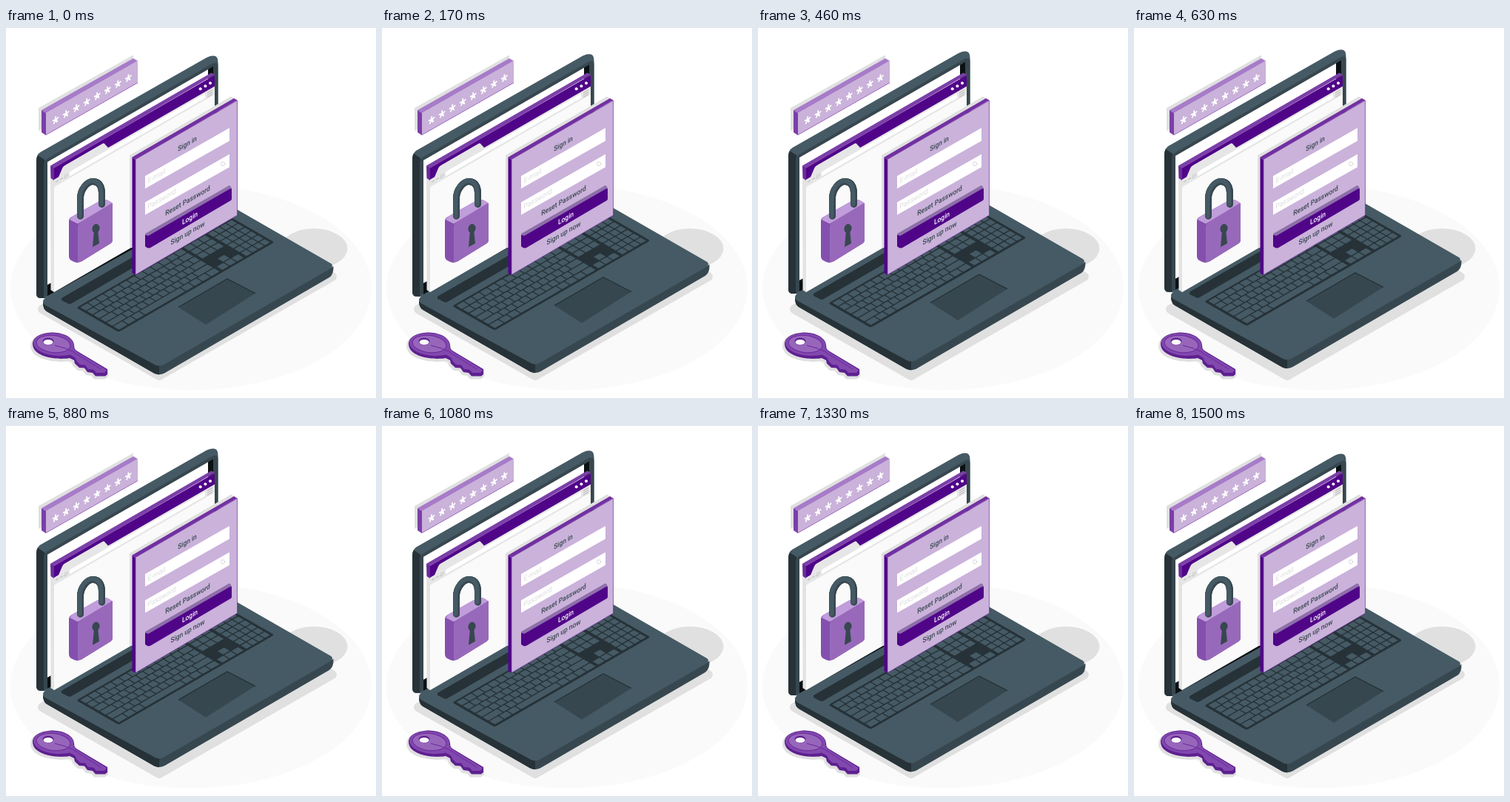
An HTML page for the animation above (1540 ms loop, 500x500 px).

```html
<!DOCTYPE html>
<html lang="en">
<head>
<meta charset="utf-8">
<title>Sign in</title>
<style>
  html, body { margin: 0; width: 100%; height: 100%; overflow: hidden; background: #fff; }
  svg { display: block; width: 100vw; height: 100vh; }
  text { font: 500 9.7px Roboto, sans-serif; fill: #37474f; text-anchor: middle; }
  .hint { font-weight: 300; fill: #c9c9c9; text-anchor: start; letter-spacing: .2px; }
</style>
</head>
<body>
<svg viewBox="0 0 500 500">
  <ellipse cx="250" cy="351" rx="244" ry="138.500" fill="#fafafa"/>
  <ellipse cx="416" cy="298" rx="45.500" ry="27" fill="#e0e0e0"/>
  <path d="M49 380 207 470 441 336 281 247Z" fill="#e0e0e0" stroke="#e0e0e0" stroke-width="12" stroke-linejoin="round"/>

  <g id="laptop">
    <!-- lid -->
    <path d="M41 359V179Q41 171 47 167.500L271 40Q286.500 33 286.500 46V250L55 365H47Q41 365 41 359Z" fill="#455a64"/>
    <path d="M41 359V179Q41 175 43 172L52 178V365H47Q41 365 41 359Z" fill="#263238"/>
    <path d="M51 364V184Q51 179.500 55 177L277 49Q286.500 44 286.500 51V250Z" fill="#37474f"/>
    <path d="M56 181 280 52V240L56 362Z" fill="#0b1013"/>
    <path d="M56 181 273 56V230L56 347Z" fill="#fff"/>
    <!-- base -->
    <path d="M50 371Q50 380 55 383L200 466.500Q207 470 214 466.500L437 337Q443 333 442.500 322L207 440Z" fill="#37474f"/>
    <path d="M50 371Q50 380 55 383L200 466.500Q203 468 207 468.500V450Z" fill="#263238"/>
    <path d="M54 364 290 232.500 437 317Q445 321 437 326L213 455Q207 458 201 455L54 375Q46 370 54 364Z" fill="#455a64"/>
    <path d="M75 365 280 247 292 254 89 372Q86 374 83 372L75 368Z" fill="#263238"/>
    <g id="keys" transform="matrix(.866 -.5 .866 .5 95 378)">
      <rect width="243" height="66" rx="3" fill="#263238"/>
    </g>
    <path d="M232.500 377 299 338.500 337 358.500 270 401Z" fill="#37474f"/>
    <path d="M233 377.300 299 339 337 358.700" fill="none" stroke="#263238" stroke-width="1.300"/>
  </g>

  <!-- browser window -->
  <path d="M60 187 65 190V357L60.500 354Z" fill="#e3e3e3"/>
  <path d="M60 186 277.500 60.500 282 63 65 190Z" fill="#7b3fa8"/>
  <path d="M60 186 65 189V206L60.500 203Z" fill="#6a2a9c"/>
  <g transform="matrix(1 -.5774 0 1 65 189)">
    <path d="M0 0H217V168H0Z" fill="#fafafa"/>
    <path d="M0 0H217V16H0Z" fill="#500589"/>
    <path d="M0 16H6L11 7Q12 5 14 5H65Q67 5 68 6.500L73 15H217V26H0Z" fill="#e6e6e6"/>
    <path d="M21 17.500H204V23.500H21Z" fill="#fff"/>
    <path d="M2 20.500H6M8 20.500H12M207 18H214M207 21H214M207 24H214" stroke="#b0b0b0"/>
    <circle cx="16" cy="20.500" r="2" fill="none" stroke="#c8c8c8"/>
  </g>
  <g fill="#fff">
    <circle cx="262.700" cy="82.300" r="2"/><circle cx="269.400" cy="78.600" r="2"/><circle cx="276" cy="74.600" r="2"/>
  </g>

  <!-- padlock -->
  <path d="M85 261Q85 257 89 255L128 233Q133 231 138 233L144 237V286Q144 290 140 292L102 315.500Q97 318 92 316L88 314Q85 312 85 308Z" fill="#8550ad"/>
  <path d="M86 259 89 255 128 233Q133 231 138 233L144 236.500 97 264.500Z" fill="#c09ddb"/>
  <path d="M97 268Q97 265 100 263L140 238.500Q144 236 144 240V286Q144 290 140 292L102 315.500Q97 318 97 313Z" fill="#9869bb"/>
  <g fill="none" stroke-linecap="round">
    <path id="arch" d="M100.500 254V230C100.500 218 110 207 118 207.500C126 208 129.500 214 129.500 223V238" stroke="#37474f" stroke-width="9"/>
    <use href="#arch"/>
    <path d="M99.500 254V230C99.500 217 109 206 117 206.500C125 207 128.500 213 128.500 223V238" stroke="#455a64" stroke-width="6"/>
  </g>
  <path d="M119 274 117 296 126 291 124 272Z" fill="#37474f"/>
  <ellipse cx="121.500" cy="271" rx="5" ry="6.200" fill="#37474f" transform="rotate(15 121.500 271)"/>

  <!-- password strip -->
  <path d="M44 108 172 36.500V70L44 139Z" fill="#e0e0e0"/>
  <path d="M48 111 172 41 178 44.500 54 115Z" fill="#a77bc9"/>
  <path d="M48 111 54 115V145L48 141Z" fill="#7b3fa8"/>
  <path d="M54 115 178 44.500V74L54 144.500Z" fill="#cab2da"/>
  <path d="M54 144.500 178 74" stroke="#8d4fb8" stroke-width=".8"/>
  <g id="stars" stroke="#fff" stroke-width="2.200" stroke-linecap="round"></g>

  <!-- sign-in panel -->
  <path d="M167 172 304 92.500 309 95.500 171 176V297L167 297Z" fill="#e0e0e0"/>
  <path d="M170.500 174.500 308 95 312.500 97.500 175 178Z" fill="#7230a2"/>
  <path d="M170.500 174.500 175 178V334L170.500 331Z" fill="#500589"/>
  <path d="M175 177.500 312.500 98V253L175 333.500Z" fill="#cab2da" stroke="#7230a2" stroke-width=".7"/>
  <path d="M188 200 302 135V152.500L188 217ZM188 235.500 302 170.500V188L188 252.500Z" fill="#fff"/>
  <circle cx="293" cy="183.500" r="2.500" fill="none" stroke="#dcdcdc" stroke-width="1.800" stroke-dasharray="1.300 .7"/>
  <path d="M188 278 302 212.500 305 216 192 282Z" fill="#8d6fa9"/>
  <path d="M188 280Q188 278 192 281L303 217Q305 216 305 218V231Q305 232.500 303 233.500L195 297Q192 298 190 296.500L188 295Z" fill="#500589"/>
  <g id="labels"></g>

  <!-- key -->
  <path d="M36 427C36 417 49 411.500 64 411.500C80 412 92.500 419.500 92 430Q92 434 96 436.500L137 461V468L134 470.500H121L117 466 110 465 106 459.500 99 459 93 453.500 92 449 86 446C70 449 36 445 36 427Z" fill="#e0e0e0" stroke="#e0e0e0" stroke-width="4" transform="translate(-1 2)"/>
  <path d="M36 427C36 417 49 411.500 64 411.500C80 412 92.500 419.500 92 430Q92 434 96 436.500L137 461V468L134 470.500H121L117 466 110 465 106 459.500 99 459 93 453.500 92 449 86 446C70 449 36 445 36 427Z" fill="#5e2090"/>
  <path d="M37 425C37.500 417 49 412.500 64 412.500C80 413 91.500 420 91 428Q90.500 433 95 437L136 462 133 466H122L118 461.500 111 461 107 455.500 100 455 95 449.500 93 445 86 441.500C68 446 38 440 37 425Z" fill="#8148ae"/>
  <ellipse cx="64" cy="427" rx="23" ry="11.500" fill="#9766bb" stroke="#6a2a9c" transform="rotate(7 64 427)"/>
  <path d="M66 429Q80 432 90 437L128 461" fill="none" stroke="#6a2a9c"/>
  <ellipse cx="57" cy="423.500" rx="7.500" ry="4.800" fill="#5e2090"/>
  <ellipse cx="57" cy="424.500" rx="6.500" ry="3.600" fill="#fafafa"/>
</svg>
<script>
  const byId = id => document.getElementById(id);
  const add = (parent, tag, attrs, text = '') => {
    const el = document.createElementNS('http://www.w3.org/2000/svg', tag);
    for (const name in attrs) el.setAttribute(name, attrs[name]);
    el.textContent = text;
    parent.append(el);
  };

  // Keyboard: each row is a list of key widths starting at u.
  const PITCH = 10.3;
  const keyRow = (u, row, widths) => {
    for (const w of widths) {
      add(byId('keys'), 'rect', {
        x: u + .7, y: 2.6 + row * PITCH, width: w - 1.5, height: PITCH - 1.6, rx: .8, fill: '#455a64'
      });
      u += w;
    }
  };
  const same = (n, w) => Array(n).fill(w);
  const rows = [
    same(13, 12.2),
    [...same(13, 11), 15.6],
    [16, ...same(12, 11), 10.6],
    [19, ...same(11, 11), 18.6],
    [24, ...same(10, 11), 24.6],
    [15, 13, 13, 64, 13, 13, 13, 14.6]
  ];
  rows.forEach((widths, i) => {
    keyRow(3, i, widths);
    keyRow(202, i, same(4, 9.6));
  });
  for (const i of [0, 1, 2, 5]) keyRow(164.5, i, same(3, 11.5));
  keyRow(176, 4, [11.5]);

  // Password asterisks: five arms each
  const arms = [0, 1, 2, 3, 4].map(k => {
    const a = k * Math.PI * 2 / 5;
    return `M0 0L${(4 * Math.sin(a)).toFixed(2)} ${(-4 * Math.cos(a)).toFixed(2)}`;
  }).join('');
  for (let i = 0; i < 8; i++) {
    add(byId('stars'), 'path', {
      d: arms,
      transform: `matrix(.9 -.5 0 1 ${67 + 14.05 * i} ${124.3 - 8.1 * i})`
    });
  }

  const label = (text, x, y, extra) =>
    add(byId('labels'), 'text', { transform: `matrix(.866 -.5 0 1 ${x} ${y})`, ...extra }, text);
  label('Sign in', 245, 159.5);
  label('Reset Password', 245.5, 236.5);
  label('Login', 248.5, 260, { style: 'fill:#fff' });
  label('Sign up now', 245.5, 280.3);
  label('E-mail', 191.5, 210, { class: 'hint' });
  label('Password', 191.5, 245, { class: 'hint' });

  // The laptop floats up and down linearly, stepped at 24 fps.
  const LOOP = 1540, PEAK = 705, HALF = 750, RISE = 10, FPS = 24;
  const laptop = byId('laptop');
  const lift = t => Math.abs(RISE * (1 - Math.abs(t - PEAK) / HALF));
  const start = performance.now();
  const draw = now => {
    const t = Math.max(0, now - start) % LOOP;
    const tick = Math.floor((t + 5) * FPS / 1000) % 37;
    const y = lift(0) - lift(tick * 1000 / FPS);
    laptop.setAttribute('transform', `translate(0 ${y.toFixed(2)})`);
    requestAnimationFrame(draw);
  };
  draw(start);
</script>
</body>
</html>
```
